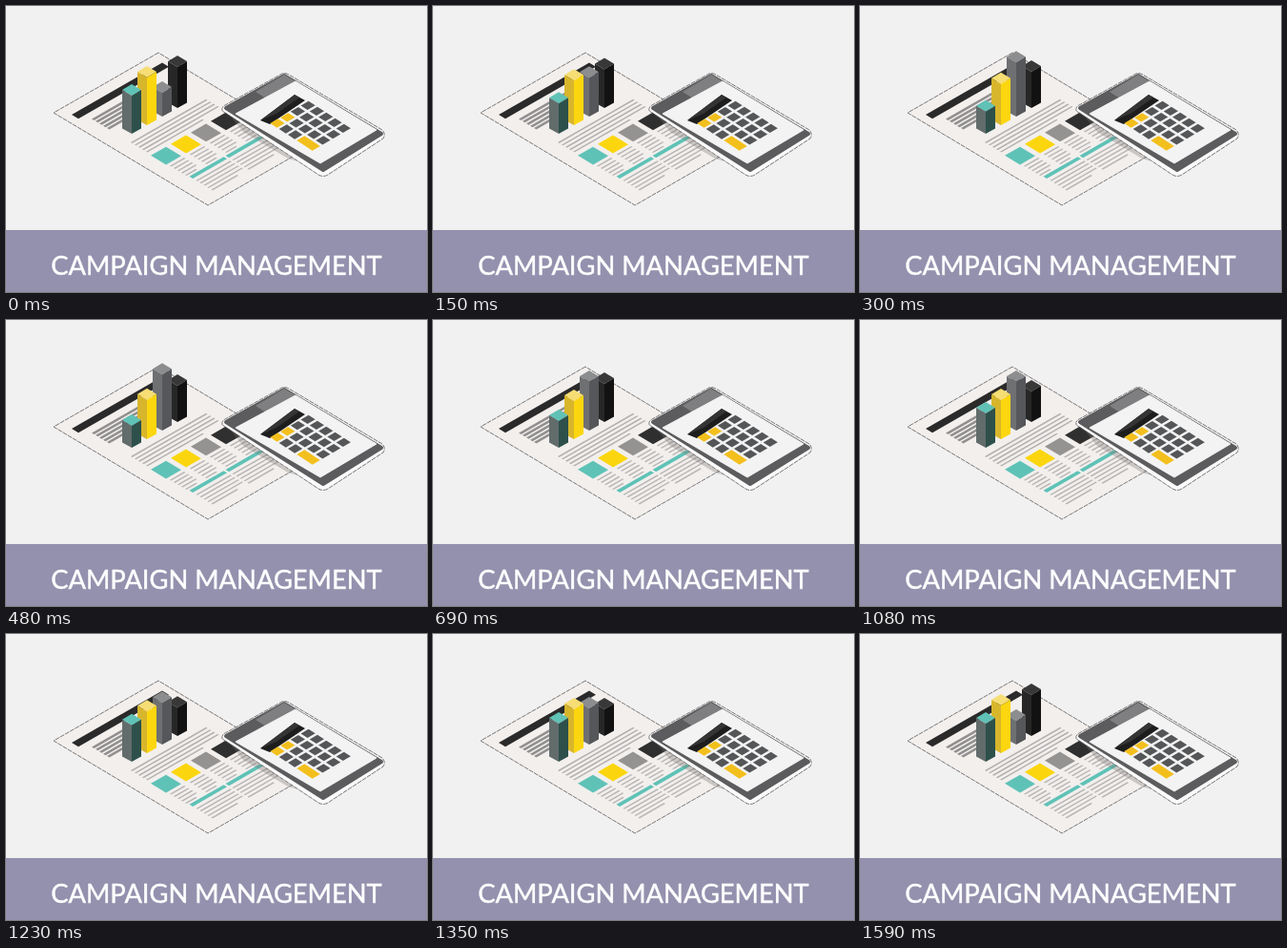
An HTML page that plays this animation: 442 by 300 pixels, repeating every 1.62 s.

```html
<!DOCTYPE html>
<html lang="en">
<head>
<meta charset="utf-8">
<title>Campaign management</title>
<style>
  html, body { margin: 0; width: 100%; height: 100%; overflow: hidden; background: #f1f1f1; }
  svg { display: block; width: 100vw; height: 100vh; }
  .edge { fill: none; stroke: #5c5a5a; stroke-width: .8; stroke-dasharray: 5 1; }
  text { font: 27.3px Lato, Calibri, sans-serif; fill: #fff; stroke: #fff; stroke-width: .45; text-anchor: middle; }
</style>
</head>
<body>
<svg viewBox="0 0 442 300">
  <rect width="442" height="300" fill="#f1f1f1"/>

  <path d="M160 49L50 112L212 209L322 146Z" fill="#f2efed"/>
  <path class="edge" d="M160 49L50 112L212 209L322 146Z"/>
  <g id="sheet" transform="matrix(1 .6 -1 .573 160 49)"></g>
  <path d="M236 116L306 163L296 160L249 132Z" fill="#77706f" opacity=".32"/>

  <g id="bars"></g>

  <g stroke-linejoin="round">
    <path d="M229 108L292 73L395 136L333 177Z" fill="#fafafa" stroke="#fafafa" stroke-width="5"/>
    <path class="edge" d="M227 110Q226 106 230 104L288 72Q292 69 297 72L395 130Q399 134 396 139L338 177Q333 180 328 177Z"/>
    <path d="M231 107L292 73L394 134L333 172Z" fill="#5c5c5e" stroke="#5c5c5e" stroke-width="4"/>
    <path d="M262 90L292 72L304 79L273 97Z" fill="#7f7f81"/>
    <path d="M241 113L304 79L389 130L330 165Z" fill="#f3f3f3" stroke="#f3f3f3"/>
  </g>
  <path d="M267 120L303 93L314 99L277 124Z" fill="#1d1d1d"/>
  <path d="M267 120L303 93L308 96L284 113Z" fill="#343434"/>
  <g id="keys" transform="matrix(9.3 6 10.7 -6.2 285 123)"></g>

  <rect y="235" width="442" height="65" fill="#9491ae"/>
  <text x="221" y="282">CAMPAIGN MANAGEMENT</text>
</svg>
<script>
const LOOP = 1620, STEP = 30;
const $ = id => document.getElementById(id);

function add(parent, tag, attrs) {
  const el = document.createElementNS('http://www.w3.org/2000/svg', tag);
  for (const k in attrs) el.setAttribute(k, attrs[k]);
  return parent.appendChild(el);
}
const box = (parent, x, y, width, height, fill) =>
  add(parent, 'rect', { x, y, width, height, fill });

// Printed page: x runs down the sheet, y from its right side to its left.
const sheet = $('sheet');
function lines(from, y, length, size, fill) {
  for (let i = 0; i < 5; i++) {
    const cut = i === 4 ? length / 4 : 0;
    box(sheet, from + i * 4, y + cut, size, length - cut, fill);
  }
}
box(sheet, 11, 7, 7, 95, '#2b2a2a');
lines(25, 45, 50, 2.5, '#918f8f');
lines(66, 16, 79, 1.5, '#b3b0b0');
['#5fc2b7', '#fbd60f', '#949392', '#2f2f2f'].forEach((fill, i) => {
  const y = 80 - i * 21;
  box(sheet, 88, y, 16, 16, fill);
  lines(107, y, 15, 1.4, '#b8b5b5');
});
for (const y of [20, 58]) {
  box(sheet, 126.5, y, 3.6, 36, '#5fc2b7');
  lines(133.5, y, 36, 1.4, '#b8b5b5');
}

// Calculator keys, with one double key at the end of the first column.
const keys = $('keys');
for (let row = 0; row < 5; row++) {
  for (let col = 0; col < 4; col++) {
    if (col === 0 && row === 4) continue;
    const long = col === 0 && row === 3;
    const yellow = long || (row === 0 && col < 2);
    box(keys, row - .38, col - .38, long ? 1.76 : .76, .76, yellow ? '#f3bf1c' : '#555658');
  }
}

// Bars, front to back: [top, left, right] colours and the top's y on each beat.
const BEATS = [0, 360, 690, 1080, 1350, 1590];
const PAUSE = 850;
const bars = [
  { fills: ['#60c2b6', '#626c6b', '#2d504b'], tops: [82, 102, 94, 86, 82] },
  { fills: ['#f6dd74', '#d8b62c', '#fcd60e'], tops: [63, 71, 73, 72, 67] },
  { fills: ['#8c8d8f', '#6f7072', '#56575a'], tops: [79, 41, 53, 53, 66] },
  { fills: ['#383838', '#272727', '#121212'], tops: [52, 58, 55, 63, 67] }
];
bars.forEach((bar, i) => {
  bar.x = 132 + 16 * i;
  bar.base = 134 - 9 * i;
  const group = add($('bars'), 'g', {});
  $('bars').prepend(group);
  bar.faces = bar.fills.map(fill => add(group, 'path', { fill }));
});

// Every bar moves evenly from beat to beat, resting from the third beat until PAUSE.
function topAt(tops, t) {
  const last = BEATS.length - 1;
  if (t >= BEATS[last]) return tops[0];
  const i = BEATS.findIndex(beat => beat > t) - 1;
  const from = i === 2 ? PAUSE : BEATS[i];
  const p = Math.max(0, (t - from) / (BEATS[i + 1] - from));
  return tops[i] + (tops[(i + 1) % last] - tops[i]) * p;
}

function draw(t) {
  for (const { x, base, tops, faces } of bars) {
    const y = topAt(tops, t), l = x - 10, r = x + 10;
    const side = w => `M${w} ${y + 6}L${x} ${y + 12}V${base}L${w} ${base - 5.5}Z`;
    faces[0].setAttribute('d', `M${x} ${y}L${r} ${y + 6}L${x} ${y + 12}L${l} ${y + 6}Z`);
    faces[1].setAttribute('d', side(l));
    faces[2].setAttribute('d', side(r));
  }
}

const start = performance.now();
function tick(now) {
  const t = Math.max(0, now - start) % LOOP;
  draw(Math.floor(t / STEP) * STEP);
  requestAnimationFrame(tick);
}
draw(0);
requestAnimationFrame(tick);
</script>
</body>
</html>
```
